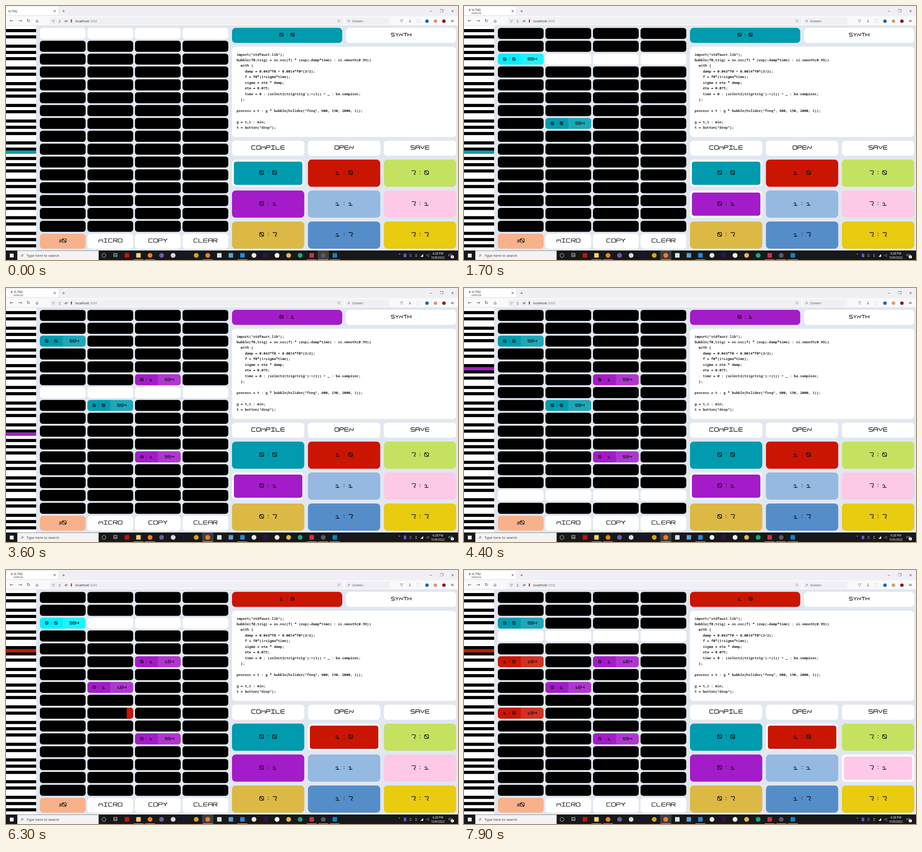
These frames come from a looping animation (998 by 561 pixels, 8000 ms). An HTML page with a canvas:

```html
<!DOCTYPE html>
<html lang="en">
<head>
<meta charset="utf-8">
<title>Step sequencer</title>
<style>
html, body { margin: 0; width: 100%; height: 100%; overflow: hidden; background: #e1e7f0; }
canvas { display: block; width: 998px; height: 561px; }
</style>
</head>
<body>
<canvas id="stage" width="998" height="561"></canvas>
<script>
const g = document.getElementById('stage').getContext('2d');
const SANS = '"Open Sans", "Noto Sans", sans-serif';
const MONO = '"Noto Sans Mono", "DejaVu Sans Mono", monospace';
const SYMBOL = '"DejaVu Sans", sans-serif';
const LOOP = 8000, STEP = 95.4, LEAD = 50;
const MOVE = 300, PRESS = 70;              // pointer travel and click delay
const TOP = 44, BOTTOM = 540, KEYS = 72;
const KEY_H = (BOTTOM - TOP) / KEYS;

// pads run column by column: 0:0, 0:1, 0:2, 1:0 ...
const PADS = '#009bae #a41bc9 #dcb945 #ca1503 #95b9e0 #558dc9 #c4e260 #fdc9e6 #e9cb10'.split(' ');
const CODE = `import("stdfaust.lib");
bubble(f0,trig) = os.osc(f) * (exp(-damp*time) : si.smooth(0.99))
  with {
    damp = 0.043*f0 + 0.0014*f0^(3/2);
    f = f0*(1+sigma*time);
    sigma = eta * damp;
    eta = 0.075;
    time = 0 : (select2(trig>trig'):+(1)) ~ _ : ba.samp2sec;
  };

process = t : g * bubble(hslider("freq", 600, 150, 2000, 1));

g = t,1 : min;
t = button("drop");`.split('\n');

// layout
const cellBox = (row, col) => ({ x: 74.8 + col * 105, y: 48.4 + row * 28.4, w: 101, h: 24.4 });
const padBox = p => ({ x: 499 + Math.floor(p / 3) * 167.7, y: 339.3 + p % 3 * 68.3, w: 159.6, h: 60 });
const keyBox = k => ({ x: 0, y: TOP + k * KEY_H, w: 66.5, h: KEY_H });
const inside = (b, p) => p.x >= b.x && p.x < b.x + b.w && p.y >= b.y && p.y < b.y + b.h;
const at = (b, part = 0.5) => ({ x: b.x + b.w * part, y: b.y + b.h / 2 });

// the pointer's stops; everything else follows from them
const stop = (time, spot, click = true) => ({ time, click, ...spot });
const STOPS = [
  stop(0, { x: 700, y: 551 }, false),
  stop(500, at(padBox(8)), false),
  stop(1130, at(cellBox(7, 1))),
  stop(1450, at(cellBox(2, 0))),
  stop(1695, at(padBox(1))),
  stop(2330, at(cellBox(11, 2))),
  stop(2700, at(cellBox(7, 2), 0), false),
  stop(3000, at(cellBox(5, 2))),
  stop(4050, at(keyBox(19))),
  stop(4700, at(cellBox(5, 2))),
  stop(5050, at(cellBox(7, 1))),
  stop(5900, at(padBox(3))),
  stop(6300, at(cellBox(9, 1), 0.86), false),
  stop(6650, at(cellBox(9, 0))),
  stop(7000, at(cellBox(5, 0))),
  stop(7850, at(padBox(7)), false)
];

function pointer(t) {
  let p = STOPS[0];
  for (const s of STOPS) {
    const k = Math.min(1, Math.max(0, 1 - (s.time - t) / MOVE)), e = k * k * (3 - 2 * k);
    p = { x: p.x + (s.x - p.x) * e, y: p.y + (s.y - p.y) * e };
  }
  return p;
}

function eachCell(fn) {
  for (let row = 0; row < 16; row++) for (let col = 0; col < 4; col++) fn(cellBox(row, col), row, row * 4 + col);
}

// replay the clicks made so far
function stateAt(t) {
  const s = { pad: 0, key: 40, notes: {}, mouse: pointer(t), row: Math.floor((t + LEAD) / STEP) % 16 };
  for (const c of STOPS.filter(c => c.click && c.time + PRESS <= t)) {
    PADS.forEach((_, p) => { if (inside(padBox(p), c)) s.pad = p; });
    for (let k = 0; k < KEYS; k++) if (inside(keyBox(k), c)) s.key = k;
    const freq = Math.floor(554.37 * 2 ** ((s.key - 40) / 12));
    eachCell((b, row, id) => { if (inside(b, c)) s.notes[id] = { pad: s.pad, freq }; });
  }
  return s;
}

// wide line lettering: strokes through a 3 by 3 lattice, a b c / d e f / g h i
const GLYPHS = {
  A: 'gaci df', C: 'cagi', E: 'cagi df', H: 'ag ci df', I: 'ac bh gi', L: 'agi', M: 'gaeci',
  N: 'gaic', O: 'bcigab', P: 'gacfd', R: 'gacfd ei', S: 'cadfig', T: 'ac bh', V: 'ahc', Y: 'aec eh',
  0: 'bcigab ai', 1: 'dbh gi', 2: 'acfgi', 4: 'adf ci', 5: 'cadfig', 6: 'cagifd'
};

function glyph(ch, cx, cy, w, h) {
  if (ch === ':') return [-0.3, 0.3].forEach(d => dot(cx, cy + d * h, h * 0.1, '#0a0a0a'));
  g.beginPath();
  for (const stroke of GLYPHS[ch].split(' ')) {
    const pts = [...stroke].map(c => {
      const i = c.charCodeAt(0) - 97;
      return [cx + (i % 3 - 1) * w / 2, cy + (Math.floor(i / 3) - 1) * h / 2];
    });
    g.moveTo(...pts[0]);
    for (let i = 1; i < pts.length - 1; i++) g.arcTo(...pts[i], ...pts[i + 1], h * 0.2);
    g.lineTo(...pts[pts.length - 1]);
  }
  g.stroke();
}
function label(str, cx, cy, gap, size = 8) {
  g.strokeStyle = '#0a0a0a';
  g.lineWidth = 0.6 + size * 0.08;
  [...String(str)].forEach((ch, i, all) => glyph(ch, cx + (i - (all.length - 1) / 2) * gap, cy, size * 1.05, size));
}
const padLabel = (p, cx, cy, size) => label(Math.floor(p / 3) + ':' + p % 3, cx, cy, size * 1.75, size);

function rect(x, y, w, h, color) {
  g.fillStyle = color;
  g.fillRect(x, y, w, h);
}
function box({ x, y, w, h }, r, color) {
  g.fillStyle = color;
  g.beginPath();
  g.roundRect(x, y, w, h, r);
  g.fill();
}
function dot(x, y, r, color) {
  g.fillStyle = color;
  g.beginPath();
  g.arc(x, y, r, 0, 7);
  g.fill();
}
function text(str, x, y, size, color, align = 'left', font = SANS) {
  g.font = size + 'px ' + font;
  g.fillStyle = color;
  g.textAlign = align;
  g.fillText(str, x, y);
}
// evenly spaced symbols centred on a line
function symbols(str, x, y, gap, size, color) {
  g.textBaseline = 'middle';
  [...str].forEach((ch, i) => text(ch, x + i * gap, y, size, color, 'center', SYMBOL));
  g.textBaseline = 'alphabetic';
}
function bright(hex) {
  const c = [1, 3, 5].map(i => Math.min(255, Math.round(parseInt(hex.slice(i, i + 2), 16) * 1.55)));
  return `rgb(${c})`;
}

function browser(t) {
  const ink = '#45454d';
  rect(0, 0, 998, 23, '#f0f0f4');
  box({ x: 1, y: 1.5, w: 115, h: 19.5 }, 2, '#d4d4da');
  box({ x: 1, y: 1.5, w: 114.5, h: 19 }, 2, '#fff');
  if (t < 2 * STEP + 16 * STEP - LEAD) text('VL7NQ', 5, 14.2, 6.2, '#222');
  else {
    symbols('◀', 12, 8.7, 0, 4.5, '#222');
    text('VL7NQ', 17, 11, 6.2, '#222');
    text('AFSPELEN', 16.5, 18, 4.6, '#333');
  }
  symbols('×+', 107.5, 11.5, 19.5, 9, ink);
  symbols('−❐×', 938, 11.5, 24, 8.5, ink);

  rect(0, 22.5, 998, TOP - 22.5, '#f9f9fb');
  rect(0, TOP - 1, 998, 0.8, '#d5d5dc');
  symbols('←→↻⌂', 12.5, 33.5, 18.6, 10, ink);
  for (const [x, w] of [[97, 648], [749, 97]]) box({ x, y: 25.5, w, h: 15.5 }, 2, '#f0f0f4');
  symbols('▽▯⇄', 104.5, 33.5, 14.2, 8, ink);
  box({ x: 143, y: 29.5, w: 2.6, h: 7 }, 1.3, '#d72b28');
  text('localhost', 153, 36, 7.2, '#222');
  text(':3000', 153 + g.measureText('localhost').width, 36, 7.2, '#85858d');
  symbols('☆', 735, 33.5, 0, 10, ink);
  symbols('⌕', 757, 33.5, 0, 11, ink);
  text('Zoeken', 764.5, 36, 7.2, '#555');
  symbols('▽↓', 873.5, 33.5, 18.6, 9, ink);
  symbols('□', 910.7, 33.5, 0, 10, '#d2d2d6');
  ['#1668b8', '#d79a67', '#8d1720'].forEach((c, i) => dot(929.5 + i * 18.7, 33.5, 3.8, c));
  symbols('≡', 985.5, 33.5, 0, 9, ink);
}

function piano(s) {
  rect(0, TOP, 66.5, BOTTOM - TOP, '#fff');
  for (let k = 0; k < KEYS; k++) {
    const n = k % 12, black = n < 5 ? n % 2 === 1 : n % 2 === 0;
    const { x, y, w, h } = keyBox(k);
    if (k === s.key) rect(x, y, w, h, PADS[s.pad]);
    else if (black) rect(x, y, w, h, '#000');
  }
}

function grid(s) {
  eachCell((b, row, id) => {
    const note = s.notes[id], lit = row === s.row, { x, y, w, h } = b;
    const color = note ? PADS[note.pad] : '#000';
    box(b, 6, !lit ? color : note ? bright(color) : '#fff');
    if (note) {
      box({ x: x + w / 2, y, w: w / 2, h }, [0, 6, 6, 0], 'rgba(255,255,255,.12)');
      padLabel(note.pad, x + w / 4, y + 11.8, 5.8);
      label(note.freq, x + w * 0.75, y + 11.8, 6.9, 5.4);
    } else if (inside(b, s.mouse)) {
      g.save();
      g.beginPath();
      g.rect(s.mouse.x, y, w, h);
      g.clip();
      box(b, 6, PADS[s.pad]);
      g.restore();
    }
  });
  ['#0', 'MICRO', 'COPY', 'CLEAR'].forEach((str, col) => {
    const b = { ...cellBox(0, col), y: 503, h: 33 }, mid = at(b).x;
    box(b, 7, col ? '#fff' : '#f8b28b');
    if (col) return label(str, mid + 0.3, 518, 10.7);
    text('#', mid - 5, 522.5, 11.5, '#0a0a0a', 'center');
    label('0', mid + 3.3, 518, 0);
  });
}

function panel(s) {
  const half = { x: 499, y: 48.3, w: 243.4, h: 33.2 };
  box(half, 8, PADS[s.pad]);
  padLabel(s.pad, 620.5, 63.5, 7);
  box({ ...half, x: 750.6 }, 8, '#fff');
  label('SYNTH', 872.5, 63.5, 9.1, 6.8);
  box({ x: 499, y: 90, w: 495, h: 199.3 }, 8, '#fff');
  g.save();
  CODE.forEach((line, i) => {
    const y = 109.5 + i * 12.46;
    text(line, 509.2, y, 7.62, '#000', 'left', MONO);
    g.lineWidth = 0.2;
    g.strokeStyle = '#000';
    g.strokeText(line, 509.2, y);
  });
  g.restore();
  ['COMPILE', 'OPEN', 'SAVE'].forEach((str, i) => {
    const b = { ...padBox(i * 3), y: 297.5, h: 33.3 };
    box(b, 7, '#fff');
    label(str, at(b).x, 312.7, 10.7);
  });
  PADS.forEach((color, p) => {
    const b = padBox(p), framed = p === s.pad || inside(b, s.mouse);
    box(b, 8, framed ? '#fff' : color);
    if (framed) box({ x: b.x + 4.2, y: b.y + 4.4, w: b.w - 8.4, h: b.h - 8.8 }, 5, color);
    padLabel(p, at(b).x, b.y + 28.7, 8.2);
  });
}

function taskbar(t) {
  const slot = i => 216 + i * 25.5, mid = 550.8;
  rect(0, BOTTOM, 998, 21, '#17181a');
  rect(slot(t < MOVE ? 19 : 9) - 12.5, BOTTOM, 25, 21, '#3d3d40');
  symbols('■', 12.8, mid, 0, 11, '#f4f4f4');
  rect(25, BOTTOM + 0.5, 179.5, 20.5, '#f3f3f3');
  symbols('⌕', 36, mid, 0, 12, '#222');
  text('Type here to search', 45.5, 554, 7.9, '#333');
  symbols('○⊟', slot(0), mid, 25.5, 12, '#f3f3f3');
  const squares = '#c4140f #f8d36b #5d9fd1 #2489d2 #3a0c58 #c9324a #0b84c9 #d9e3eb #17143a';
  '#c4140f #f8d36b #ef7f1a #6f5a9c #d6d9e4 #17143a #cda61d #f47a24 #d9e3eb #5d9fd1 #2489d2 #e8e8e8 #3a0c58 #f4f4f4 #e9b44b #17a878 #c9324a #5a5a5e #0b84c9'
    .split(' ').forEach((color, i) => {
      const x = slot(i + 2);
      if (squares.includes(color)) box({ x: x - 5, y: mid - 5, w: 10, h: 10 }, 1, color);
      else dot(x, mid, 5.3, color);
    });
  for (const i of [3, 4, 9, 12, 18, 19, 20]) rect(slot(i) - 11, 559.8, 22, 1.2, '#78b9e6');

  symbols('⌃▮▯▯◢◁', 868.5, mid, 12.4, 8, '#eee');
  box({ x: 878, y: 547, w: 6, h: 8 }, 1, '#6255c8');
  text('4:28 PM', 953.5, 548.7, 6.4, '#fff', 'center');
  text('10/8/2022', 953.5, 557.5, 6.4, '#fff', 'center');
  symbols('▭', 981, mid, 0, 10, '#eee');
  dot(985.5, 554, 3.6, '#f1f1f1');
  text('1', 985.5, 556.2, 5.6, '#111', 'center');
}

function draw(t) {
  const s = stateAt(t);
  rect(0, 0, 998, 561, '#e1e7f0');
  piano(s);
  grid(s);
  panel(s);
  browser(t);
  taskbar(t);
}

let start;
function tick(now) {
  start ??= now;
  draw(Math.max(0, now - start) % LOOP);
  requestAnimationFrame(tick);
}
draw(0);
requestAnimationFrame(tick);
</script>
</body>
</html>
```
